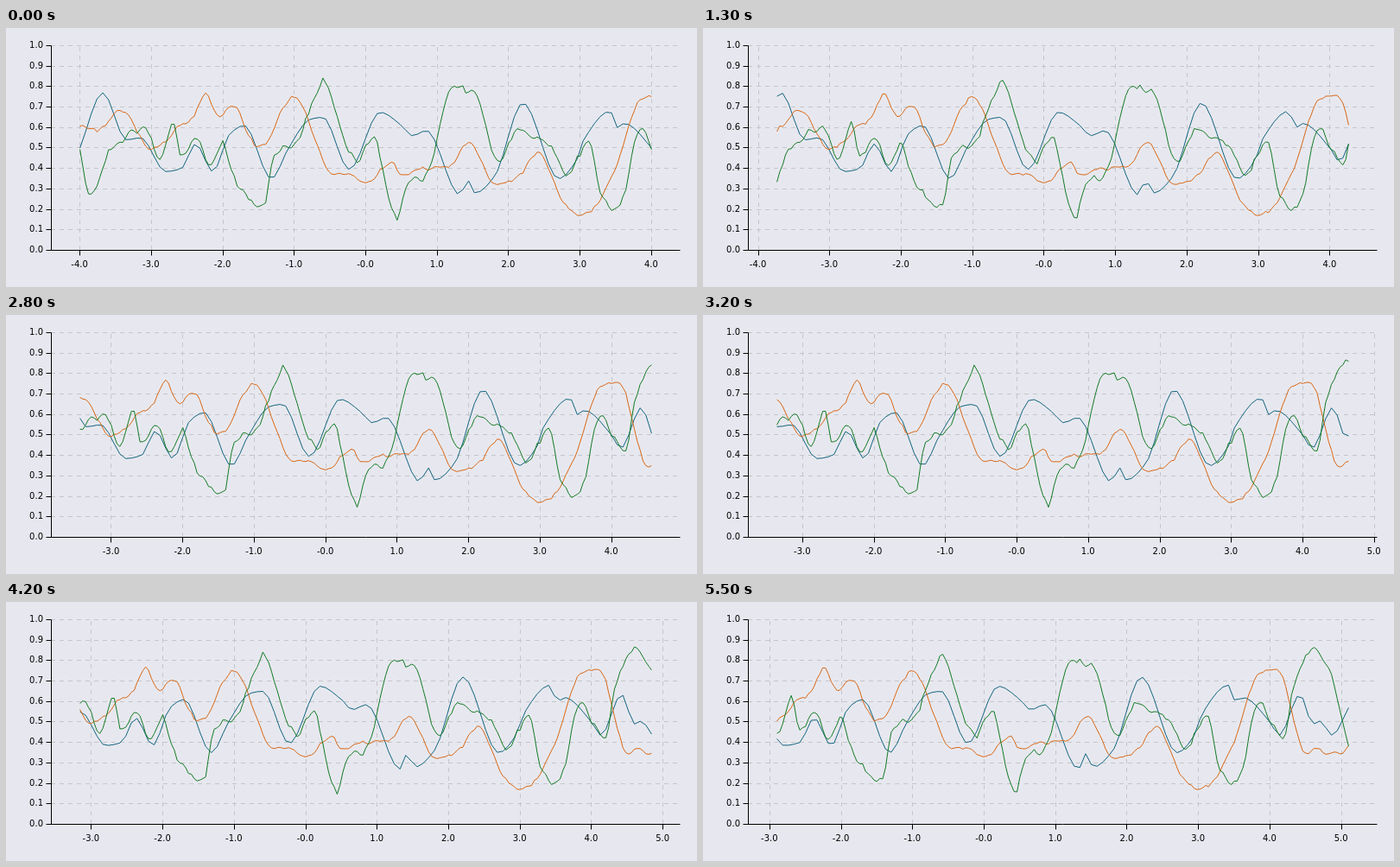
An HTML page with a canvas that plays this animation: 800 by 300 pixels, repeating every 5550 ms.

```html
<!DOCTYPE html>
<html lang="en">
<head>
<meta charset="utf-8">
<style>
html, body { margin: 0; width: 100%; height: 100%; overflow: hidden; background: #e7e8ef }
canvas { display: block }
</style>
</head>
<body>
<canvas width="800" height="300"></canvas>
<script>
const ctx = document.querySelector('canvas').getContext('2d');
const LEFT = 52, RIGHT = 780, TOP = 20, BOTTOM = 257, HEIGHT = BOTTOM - TOP;
const UNIT = (RIGHT - LEFT) / 8.8;
const FRAME = 50, LOOP = 5550;

// Each series: its main hills and valleys as [x, value], plus fine seeded noise.
const blue = {color: '#12647f', step: .08, noise: 0, keys: [
  [-4, .5], [-3.68, .77], [-3.35, .54], [-3.15, .55], [-2.8, .385], [-2.58, .4],
  [-2.38, .52], [-2.14, .385], [-1.9, .57], [-1.7, .61], [-1.32, .35], [-1.08, .5],
  [-.78, .64], [-.6, .65], [-.23, .395], [.2, .675], [.5, .61], [.65, .56], [.85, .585],
  [1.32, .27], [1.42, .345], [1.53, .28], [1.8, .36], [2.2, .72], [2.7, .35],
  [2.95, .44], [3.05, .54], [3.42, .68], [3.52, .6], [3.62, .62], [4, .5], [4.13, .435],
  [4.42, .635], [4.6, .49], [4.7, .505], [4.87, .435], [5.1, .57]]};

const orange = {color: '#d96614', step: .04, noise: .012, seed: 3, keys: [
  [-4, .61], [-3.77, .585], [-3.43, .69], [-3, .5], [-2.8, .53], [-2.6, .62], [-2.47, .63],
  [-2.24, .76], [-2.05, .66], [-1.87, .705], [-1.5, .5], [-1, .75], [-.45, .37], [-.2, .37],
  [0, .325], [.37, .43], [.5, .36], [.7, .4], [1.15, .4], [1.42, .53], [1.85, .315],
  [2.1, .35], [2.43, .475], [2.75, .24], [3, .165], [3.25, .23], [3.48, .39], [3.85, .73],
  [4.1, .755], [4.52, .34], [4.63, .375], [4.8, .345], [5.03, .345], [5.1, .38]]};

const green = {color: '#137a25', step: .04, noise: .022, seed: 8, keys: [
  [-4, .5], [-3.85, .27], [-3.55, .5], [-3.1, .6], [-2.88, .45], [-2.7, .61], [-2.58, .46],
  [-2.36, .55], [-2.2, .41], [-2.02, .52], [-1.85, .36], [-1.45, .21], [-1.25, .48],
  [-1, .52], [-.56, .83], [-.4, .65], [-.12, .43], [.1, .55], [.43, .16], [.6, .33],
  [.85, .37], [1.22, .8], [1.55, .76], [1.85, .43], [2.12, .59], [2.55, .51], [2.83, .38],
  [3.12, .54], [3.3, .27], [3.45, .21], [3.6, .25], [3.83, .59], [4.18, .42], [4.33, .66],
  [4.58, .85], [4.82, .76], [5.1, .38]]};

function random(n) {
  const v = Math.sin(n * 127.1) * 43758.5453;
  return v - Math.floor(v);
}

function roughness(x, seed) {
  const p = (x + 4) * 20, i = Math.floor(p), a = random(i + seed * 1000);
  return 2 * (a + (random(i + 1 + seed * 1000) - a) * (p - i)) - 1;
}

const slope = (a, b) => (b[1] - a[1]) / (b[0] - a[0]);

// Level at turning points, harmonic mean elsewhere.
function tangent(keys, i) {
  if (!keys[i - 1]) return slope(keys[0], keys[1]);
  if (!keys[i + 1]) return slope(keys[i - 1], keys[i]);
  const l = slope(keys[i - 1], keys[i]), r = slope(keys[i], keys[i + 1]);
  return l * r > 0 ? 2 * l * r / (l + r) : 0;
}

function valueAt({keys, noise, seed = 0}, x) {
  const next = keys.findIndex(key => key[0] > x);
  const j = next < 0 ? keys.length - 1 : Math.max(next, 1);
  const [x0, y0] = keys[j - 1], [x1, y1] = keys[j];
  const w = x1 - x0, u = (x - x0) / w, v = 1 - u;
  return y0 * v * v * (1 + 2 * u) + y1 * u * u * (1 + 2 * v)
    + w * u * v * (tangent(keys, j - 1) * v - tangent(keys, j) * u)
    + noise * roughness(x, seed);
}

function line(x1, y1, x2, y2, color, dash = []) {
  ctx.strokeStyle = color;
  ctx.setLineDash(dash);
  ctx.beginPath();
  ctx.moveTo(x1, y1);
  ctx.lineTo(x2, y2);
  ctx.stroke();
}

function label(text, x, y, align) {
  ctx.textAlign = align;
  ctx.fillText(text, x, y);
}

function drawAxes(shift) {
  const grid = '#c5c6ca', dash = [5, 5];
  ctx.fillStyle = '#000';
  ctx.font = '10px "DejaVu Sans", sans-serif';
  for (let i = 0; i <= 10; i++) {
    const y = BOTTOM - Math.round(i * HEIGHT / 10);
    line(LEFT - .5, y, RIGHT, y, grid, dash);
    line(LEFT - 6, y, LEFT, y, '#000');
    label((i / 10).toFixed(1), LEFT - 9.5, y + 2.5, 'right');
  }
  for (let n = Math.ceil(shift - 4.4); n <= shift + 4.4 + 1e-9; n++) {
    const exact = LEFT + (n + 4.4 - shift) * UNIT, x = Math.round(exact);
    line(x, BOTTOM - .5, x, TOP, grid, dash);
    line(x, BOTTOM, x, BOTTOM + 6, '#000');
    label(n ? n.toFixed(1) : '-0.0', exact - .5, BOTTOM + 19.5, 'center');
  }
  line(LEFT, TOP, LEFT, BOTTOM, '#000');
  line(LEFT, BOTTOM, RIGHT, BOTTOM, '#000');
}

function drawSeries(series, shift) {
  const {color, step} = series, count = Math.round(8 / step);
  const pts = Array.from({length: count + 1}, (_, i) => [
    LEFT + (.4 + i * step) * UNIT,
    BOTTOM - HEIGHT * valueAt(series, shift - 4 + i * step)]);
  ctx.strokeStyle = color;
  ctx.setLineDash([]);
  ctx.beginPath();
  for (const p of pts) ctx.lineTo(...p);
  ctx.stroke();
}

const start = performance.now();

function draw() {
  const time = Math.max(0, performance.now() - start) % LOOP;
  const shift = Math.floor(time / FRAME) / 100;
  ctx.setTransform(1, 0, 0, 1, 0, 0);
  ctx.fillStyle = '#e7e8ef';
  ctx.fillRect(0, 0, 800, 300);
  ctx.translate(.5, .5);
  drawAxes(shift);
  for (const series of [blue, orange, green]) drawSeries(series, shift);
  requestAnimationFrame(draw);
}
draw();
</script>
</body>
</html>
```
